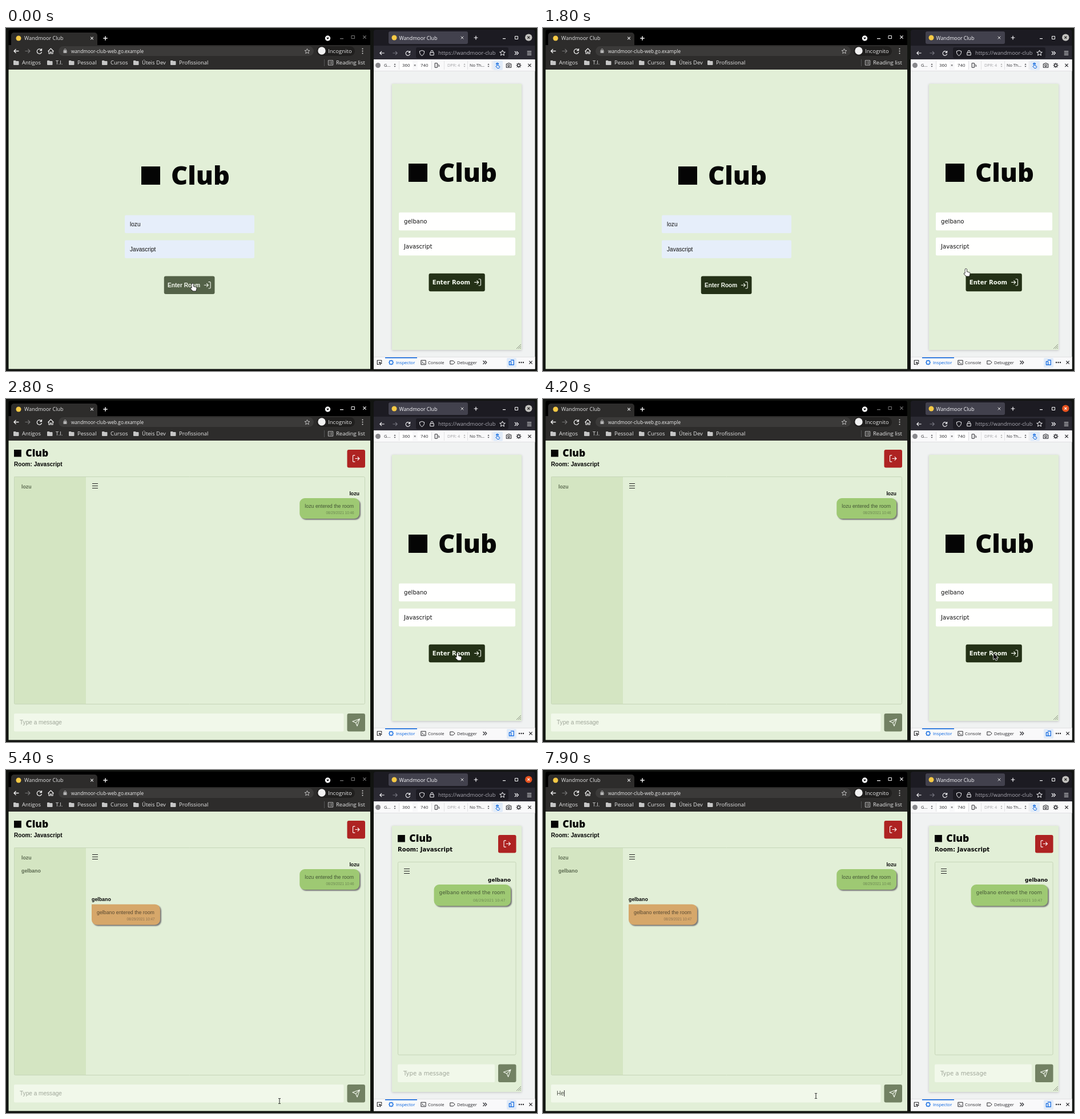
An HTML page with a canvas that plays this animation: 930x602 px, repeating every 8000 ms.

```html
<!DOCTYPE html>
<html lang="en">
<head>
<meta charset="utf-8">
<title>Chat demo</title>
<style>
html, body { margin: 0; width: 100%; height: 100%; overflow: hidden; background: #121411; }
canvas { display: block; }
</style>
</head>
<body>
<canvas id="stage" width="930" height="602"></canvas>
<script>
const c = document.getElementById('stage').getContext('2d');
const LOOP = 8000, STEP = 100;
const UI = '"Open Sans", sans-serif';
const ARIAL = '"Liberation Sans", Arial, sans-serif';
const DEJA = '"DejaVu Sans", sans-serif';
const PAGE = '#e2efd7', DARK = '#243117', YELLOW = '#f6c945';
const WORD = 'Club', NAME = 'Wandmoor ' + WORD, ADDRESS = 'wandmoor-club-web.go.example';
const ANN = 'lozu', BOB = 'gelbano', TOPIC = 'Javascript';

// Icons live in a 24 x 24 box
const ICON = {
  enter: 'M15 3h4a2 2 0 0 1 2 2v14a2 2 0 0 1-2 2h-4M10 17l5-5-5-5M15 12H3',
  leave: 'M9 21H5a2 2 0 0 1-2-2V5a2 2 0 0 1 2-2h4M16 17l5-5-5-5M21 12H9',
  send: 'M22 2L11 13M22 2l-7 20-4-9-9-4z',
  menu: 'M2 4H22M2 12H22M2 20H22',
  back: 'M21 12H4M11 5l-7 7 7 7',
  next: 'M3 12H20M13 5l7 7-7 7',
  reload: 'M20 3v7h-7M19.5 9.5A8.3 8.3 0 1 0 20 15',
  home: 'M2 13L12 3l10 10M5 11v10h5v-6h4v6h5V11',
  lock: 'M5 11h14v10H5zM8 11V7a4 4 0 0 1 8 0v4',
  star: 'M12 2l3 7 7.5.6-5.8 5 1.8 7.4L12 18l-6.5 4 1.8-7.4-5.8-5L9 9z',
  cross: 'M4 4L20 20M20 4L4 20',
  plus: 'M12 3V21M3 12H21',
  shield: 'M12 2l9 3c0 9-3 14-9 17C6 19 3 14 3 5z',
  more: 'M4 4l8 8-8 8M13 4l8 8-8 8',
  sort: 'M8 9l4-5 4 5zM8 15l4 5 4-5z',
  list: 'M3 3h18v18H3zM7 8h2M12 8h5M7 12h2M12 12h5M7 16h2M12 16h5',
  rotate: 'M4 3h10v18H4zM17 8c4 0 4 3 4 8M18 14l3 3 2-3',
  touch: 'M9 14V6a2 2 0 0 1 4 0v7l6 2c2 1 1 7-2 8h-6l-6-7 2-1zM6 8a5 5 0 1 1 10 0',
  camera: 'M2 6h5l2-3h6l2 3h5v15H2zM16 13a4 4 0 1 1-8 0a4 4 0 1 1 8 0',
  gear: 'M17 12a5 5 0 1 1-10 0a5 5 0 1 1 10 0M12 2v4M12 18v4M2 12h4M18 12h4M5 5l3 3M16 16l3 3M19 5l-3 3M8 16l-3 3',
  picker: 'M10 20H3V3h18v8M11 11l11 4-5 2-2 5z',
  box: 'M5 5h14v14H5zM12 1v4M12 19v4M1 12h4M19 12h4',
  console: 'M2 3h20v18H2zM6 8l4 4-4 4M12 16h5',
  tag: 'M2 5h13l7 7-7 7H2z',
  device: 'M8 2h13v20H8M2 8h8v14H2z'
};
const HAND = new Path2D('M-1 0c1-1 2 0 2 1v4l4 1q2 0 1.5 3l-1 3.5h-5l-4-4q0-2 2-.5V1z');
const ARROW = new Path2D('M0 0V11l2.6-2.3 1.9 4 2-1-1.9-3.7H8z');
const BEAM = new Path2D('M-2-4.5h1.500L0-4v8l-.5.5H-2M2-4.5H.5L0-4M0 4l.5.5H2');

function rect(x, y, w, h, fill, r = 0, stroke) {
  c.beginPath();
  c.roundRect(x, y, w, h, r);
  if (fill) { c.fillStyle = fill; c.fill(); }
  if (stroke) { c.strokeStyle = stroke; c.lineWidth = 1; c.stroke(); }
}
function dot(x, y, r, fill) {
  c.beginPath();
  c.arc(x, y, r, 0, 7);
  c.fillStyle = fill;
  c.fill();
}
function text(s, x, y, size, color, font = UI, weight = 400, align = 'left') {
  c.font = `${weight} ${size}px ${font}`;
  c.fillStyle = color;
  c.textAlign = align;
  c.fillText(s, x, y);
}
function icon(name, x, y, size, color, line = 1, fill) {
  const k = size / 24, p = new Path2D(ICON[name]);
  c.save();
  c.translate(x - size / 2, y - size / 2);
  c.scale(k, k);
  c.lineWidth = line / k;
  c.lineJoin = 'round';
  c.strokeStyle = c.fillStyle = color;
  fill ? c.fill(p) : c.stroke(p);
  c.restore();
}

function logo(x, y, k) {
  rect(x, y, 33 * k, 32 * k, '#050505');
  text(WORD, x + 52 * k, y + 32 * k, 45 * k, '#050505', UI, 800);
}

function login(font, logoX, logoY, x, y, w, fill, user, bx, bw, alpha) {
  logo(logoX, logoY, 1);
  [user, TOPIC].forEach((s, i) => {
    rect(x, y + 44 * i, w, 31.5, fill, 2);
    text(s, x + 9, y + 19.5 + 44 * i, 10.08, '#111', font);
  });
  c.globalAlpha = alpha;
  rect(bx, y + 107, bw, 31.5, DARK, 3);
  c.globalAlpha = 1;
  text('Enter Room', bx + 6.3, y + 126.3, 10.08, '#f3f8ee', font, 700);
  icon('enter', bx + bw - 13, y + 122.7, 15.1, '#f3f8ee', 1.1);
}

function room(font, x, y, w, panelH, inputY, side, typed, caret) {
  logo(x, y, .39);
  text('Room: ' + TOPIC, x, y + 29.3, 10.08, '#050505', font, 700);
  const bx = x + w - 31.5;
  rect(bx, y, 31.5, 31.5, '#ae2322', 3);
  icon('leave', bx + 15.7, y + 15.5, 15.1, '#fff', 1.1);
  if (side) rect(x, y + 47, side, panelH, '#d4e5c2');
  rect(x + .5, y + 47.5, w - 1, panelH, null, 2, '#c6d6b8');
  icon('menu', x + side + 16, y + 63.5, 12, '#222', 1.2);
  rect(x, inputY, w - 37.5, 31.5, '#f1f8ea', 2);
  text(typed || 'Type a message', x + 10, inputY + 19, 10.08, typed ? '#4c5147' : '#a0a79a', font);
  if (caret) rect(x + 10 + (typed ? c.measureText(typed).width : 0), inputY + 10, 1, 11, '#333');
  rect(bx, inputY, 31.5, 31.5, '#728163', 3);
  icon('send', bx + 15.7, inputY + 15.7, 15.1, '#f3f8ee', 1.1);
}

function message(font, who, edge, y, own, date, h) {
  const s = who + ' entered the room';
  c.font = `8.82px ${font}`;
  const w = c.measureText(s).width + 19, x = own ? edge - w : edge;
  text(who, edge, y - 5.3, 8.82, '#050505', font, 700, own ? 'right' : 'left');
  c.save();
  c.shadowColor = '#777';
  c.shadowBlur = 2;
  c.shadowOffsetX = c.shadowOffsetY = 2;
  rect(x, y, w, h, own ? '#9ec973' : '#d6a76a', own ? 9 : [0, 9, 9, 9]);
  c.restore();
  text(s, x + 9, y + 17.3, 8.82, own ? '#435535' : '#5a4a32', font);
  text('08/29/2021 ' + date, x + w - 9.5, y + h - 8, 6.3, own ? '#6d8853' : '#8d7350', font, 400, 'right');
}

function leftFrame(active) {
  rect(4.5, 3, 633.5, 595.5, '#000', [4, 4, 0, 0]);
  rect(9, 8, 151, 24, '#2d2c2b', [5, 5, 0, 0]);
  rect(4.5, 30, 633.5, 43, '#2d2c2b');
  dot(22, 18, 4.5, YELLOW);
  text(NAME, 32, 21.3, 9, '#e6e6e6');
  icon('cross', 150.5, 18, 7, '#ddd', 1.2);
  icon('plus', 174, 18, 10, '#eee', 1.5);
  dot(563.5, 18, 4.7, '#fff');
  c.beginPath();
  c.moveTo(561, 16.8); c.lineTo(566, 16.8); c.lineTo(563.5, 20);
  c.fillStyle = '#000';
  c.fill();
  const tint = active ? '#f2f2f2' : '#777';
  rect(585, 18, 6, 1.3, tint);
  rect(605, 13.5, 5.5, 5, null, 0, tint);
  icon('cross', 628, 16, 8, tint, 1.2);

  icon('back', 18, 40.5, 12, '#eee', 1.4);
  icon('next', 38, 40.5, 12, '#777', 1.2);
  icon('reload', 58.5, 40.5, 12, '#eee', 1.3);
  icon('home', 78.5, 40.5, 12, '#eee', 1.2);
  rect(92, 32, 447, 17, '#3b3a39', 8.5);
  icon('lock', 103.5, 40, 9, '#bbb', 1);
  rect(101.5, 40, 4, 3, '#bbb');
  text(ADDRESS, 114, 43.5, 8.3, '#eee');
  icon('star', 527.5, 40.5, 10, '#ccc', .9);
  rect(544, 32, 67, 17, '#201f1e', 8.5);
  dot(553, 40, 6.7, '#f1f1f1');
  text('Incognito', 564, 43.7, 9.6, '#e6e6e6');
  for (const y of [36.5, 40.5, 44.5]) dot(624.5, y, 1, '#ddd');

  [['Antigos', 28], ['T.I.', 87], ['Pessoal', 125], ['Cursos', 183], ['Úteis Dev', 238], ['Profissional', 303]]
    .forEach(([s, x]) => {
      rect(x - 15, 57, 4.5, 3, '#c6c6c6', 1);
      rect(x - 15, 58, 9.5, 7, '#c6c6c6', 1);
      text(s, x, 64.3, 9.5, '#e6e6e6');
    });
  rect(557, 55, 1, 12, '#555');
  icon('list', 568.5, 61, 11, '#ccc', .9);
  text('Reading list', 578, 64.3, 9.5, '#e6e6e6');
  rect(4.5, 73, 633.5, 525.5, PAGE);
}

function rightFrame(active) {
  const ink = '#fbfbfe', dev = '#28282c', blue = '#0060df';
  rect(644, 3, 282.5, 595.5, '#1c1b22', [4, 4, 0, 0]);
  rect(670, 6, 139, 22, '#42414d', 3);
  dot(680, 17, 4.5, YELLOW);
  text(NAME, 688.5, 20.5, 8.8, ink);
  icon('cross', 799, 17, 7, '#ddd', 1);
  icon('plus', 823, 17, 9, ink, 1.2);
  rect(870, 18, 5, 1.2, ink);
  rect(891.5, 14.5, 5, 5, null, 0, ink);
  dot(915.3, 16.6, 6.2, active ? '#e95420' : '#c3c2bf');
  icon('cross', 915.3, 16.6, 6, active ? '#fff' : '#222', 1.2);

  rect(644, 31, 282.5, 25, '#2b2a33');
  rect(718, 34, 162, 19, '#1c1b22', 3);
  icon('back', 658.5, 44, 11, ink, 1.1);
  icon('next', 681.5, 44, 11, '#777680', 1.1);
  icon('reload', 704, 44, 11, ink, 1.1);
  icon('shield', 728.5, 44, 11, ink, 1);
  icon('lock', 746, 43.5, 11, ink, 1);
  text('https://wandmoor-club', 757, 47.3, 9.3, '#aaa9b2');
  icon('star', 869.5, 43.5, 11, ink, 1);
  icon('more', 894, 44, 9, ink, 1.2);
  icon('menu', 916.5, 44, 9, ink, 1.1);

  rect(644, 55.3, 282.5, 543.2, '#f0f2f2');
  rect(644, 55.3, 282.5, 19.7, '#f9f9fa');
  rect(644, 75, 282.5, 1, '#e0e0e2');
  dot(651.5, 65.5, 4.5, '#87878b');
  text('G…', 662, 68.3, 7.5, dev);
  for (const x of [681, 803, 845]) icon('sort', x, 65.5, 9, x === 803 ? '#999' : dev, 1, true);
  for (const x of [688, 745, 767, 808, 851]) rect(x, 58, 1, 15, '#e2e2e4');
  rect(690, 58, 22, 15, '#fff');
  rect(721, 58, 23, 15, '#fff');
  text('360', 694, 68.3, 7.8, dev);
  text('×', 714, 68.3, 7.5, dev);
  text('740', 726, 68.3, 7.8, dev);
  icon('rotate', 754.5, 65.5, 10, dev);
  text('DPR: 4', 773, 68.3, 7.3, '#a0a0a4');
  text('No Th…', 812, 68.3, 7.3, dev);
  rect(853, 57, 17, 17, '#e1ebf8', 2);
  icon('touch', 861, 65.5, 11, blue);
  icon('camera', 880.5, 65.5, 10, dev, 1.1);
  icon('gear', 898, 65.5, 11, dev, 1.2);
  icon('cross', 917, 65.5, 8, dev, 1.2);

  rect(644, 577, 282.5, 21.5, '#f9f9fa');
  rect(644, 577, 282.5, 1, '#e0e0e2');
  icon('picker', 654, 587, 10, dev, 1.1);
  rect(664, 578, 56, 1.5, blue);
  icon('box', 674.5, 587, 10, blue, 1.1);
  text('Inspector', 683, 589.8, 7.6, blue);
  icon('console', 731, 587, 10, dev, 1);
  text('Console', 739, 589.8, 7.6, dev);
  icon('tag', 782, 587, 10, dev, 1);
  text('Debugger', 790, 589.8, 7.6, dev);
  icon('more', 838.5, 587, 9, dev, 1.1);
  rect(877, 579, 17, 17, '#e1ebf8', 2);
  icon('device', 885.5, 587, 10, blue, 1.1);
  for (const x of [899, 902.5, 906]) dot(x, 587, 1.2, dev);
  icon('cross', 919, 587, 8, dev, 1.2);

  c.save();
  c.shadowColor = '#0003';
  c.shadowBlur = 4;
  c.shadowOffsetY = 1;
  rect(676, 98, 227, 467, PAGE);
  c.restore();
}

function grip() {
  c.beginPath();
  for (const d of [8, 5, 2]) { c.moveTo(902 - d, 563); c.lineTo(902, 563 - d); }
  c.strokeStyle = '#8a9182';
  c.lineWidth = 1;
  c.stroke();
}

// Pointer path: time, x, y, shape until the next point
const PATH = [
  [0, 327, 449, 'hand'], [1300, 327, 449, 'arrow'], [1500, 470, 480, 'arrow'],
  [1700, 670, 440, 'arrow'], [1800, 741, 423, 'hand'], [1900, 772, 459, 'hand'],
  [2000, 820, 462, 'hand'], [2100, 776, 463, 'hand'], [2200, 776, 463, 'hand'],
  [2400, 791, 446, 'hand'], [4100, 791, 446, 'hand'], [4200, 789, 446, 'arrow'],
  [4800, 789, 446, 'arrow'], [5200, 500, 556, 'beam'], [5300, 500, 556, 'beam'],
  [5400, 479, 581, 'beam'], [5500, 478, 572, 'beam'], [LOOP, 478, 572, 'beam']
];
function pointer(t) {
  const i = PATH.findIndex(p => p[0] > t);
  const [t0, x0, y0, shape] = PATH[i - 1], [t1, x1, y1] = PATH[i];
  const k = (t - t0) / (t1 - t0);
  c.save();
  c.translate(x0 + (x1 - x0) * k, y0 + (y1 - y0) * k);
  c.lineJoin = 'round';
  if (shape === 'beam') {
    c.strokeStyle = '#222';
    c.lineWidth = 1;
    c.stroke(BEAM);
  } else {
    const hand = shape === 'hand', path = hand ? HAND : ARROW;
    c.strokeStyle = hand ? '#111' : '#fff';
    c.lineWidth = 1.5;
    c.stroke(path);
    c.fillStyle = hand ? '#fff' : '#111';
    c.fill(path);
  }
  c.restore();
}

function draw(t) {
  const rightActive = t >= 3500 && t < 5700;
  rect(0, 0, 930, 602, '#121411');
  leftFrame(t >= 1000 && !rightActive);
  rightFrame(rightActive);

  if (t < 1900) {
    const alpha = t < 100 ? .74 : t < 1400 ? .7 : 1;
    login(ARIAL, 237, 243, 208, 328.6, 227, '#e6eefa', ANN, 276.8, 88.7, alpha);
  } else {
    const typed = t < 7300 ? '' : t < 7900 ? 'H' : 'He';
    room(ARIAL, 14, 89, 615, 399, 552, 126, typed, t >= 5800 && t < 6400 || t >= 7300);
    if (t >= 2800) {
      text(ANN, 27, 157, 8.82, '#5c6a50', ARIAL, 700);
      message(ARIAL, ANN, 619, 174, true, '10:46', 36);
    }
    if (t >= 4900) {
      text(BOB, 27, 179.7, 8.82, '#5c6a50', ARIAL, 700);
      message(ARIAL, BOB, 150, 235.7, false, '10:47', 36);
    }
  }

  if (t < 4500) {
    login(DEJA, 705, 238, 688, 323.7, 204, '#fffffe', BOB, 740.5, 98.3, 1);
  } else {
    room(DEJA, 686, 114, 207.5, 338.5, 516.5, 0);
    if (t >= 5400) message(DEJA, BOB, 884, 201, true, '10:47', 37.5);
  }
  grip();
  pointer(t);
}

let last = -1;
function tick() {
  const t = Math.floor(performance.now() % LOOP / STEP) * STEP;
  if (t !== last) draw(last = t);
  requestAnimationFrame(tick);
}
tick();
</script>
</body>
</html>
```
